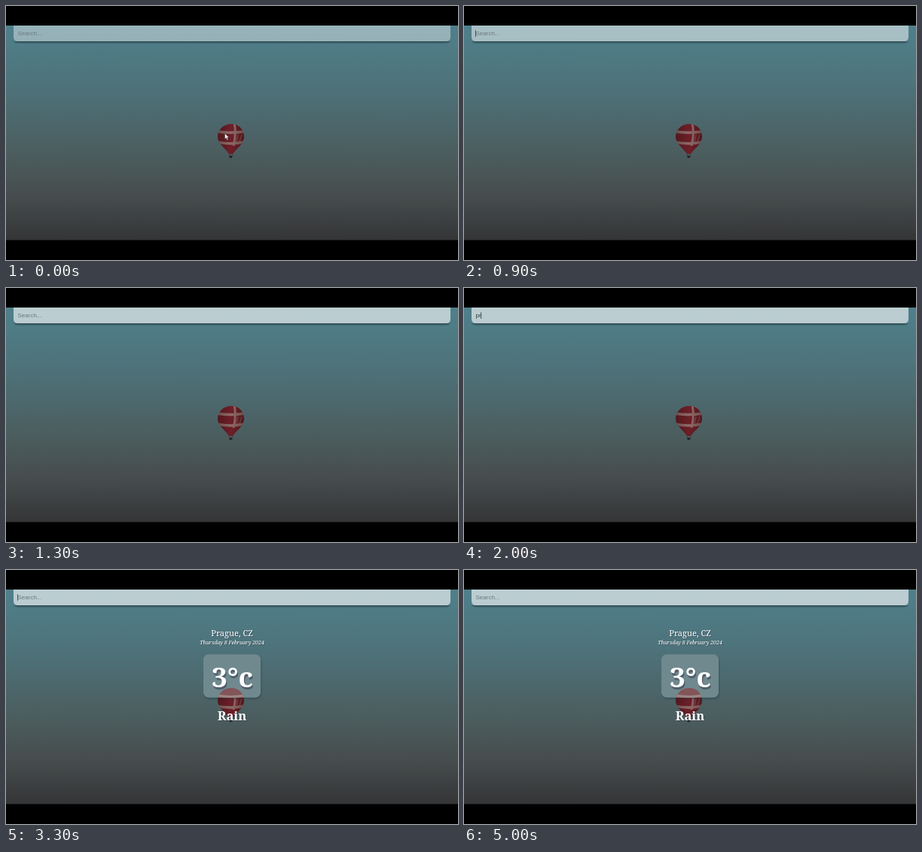
Animation of 600x338 px, one loop 5600 ms. Source, as an HTML page:

```html
<!DOCTYPE html>
<html lang="en">
<head>
<meta charset="utf-8">
<title>Weather search</title>
<style>
  html, body { margin: 0; width: 100%; height: 100%; overflow: hidden; background: #000; }
  svg { display: block; width: 100vw; height: 100vh; }
  .field { font: 8px "Liberation Sans", Arial, sans-serif; white-space: pre; }
  #weather { font-family: "Noto Serif", serif; fill: #fff; text-anchor: middle; }
  .place { font-size: 11px; text-shadow: 1px 1px rgba(50, 50, 70, .5); }
  .date { font-size: 7px; font-style: italic; text-shadow: 1px 1px rgba(50, 50, 70, .5); }
  .temp { font-size: 36.7px; font-weight: 700; text-shadow: 1.3px 2.6px rgba(50, 50, 70, .5); }
  .sky { font-size: 16.6px; font-weight: 700; text-shadow: 1.3px 1.3px rgba(50, 50, 70, .5); }
</style>
</head>
<body>
<svg viewBox="0 0 600 338">
  <defs>
    <linearGradient id="dusk" x1="0" y1="0" x2="0" y2="1">
      <stop offset="0" stop-color="#4f808b"/>
      <stop offset=".25" stop-color="#4e747c"/>
      <stop offset=".45" stop-color="#4c676c"/>
      <stop offset=".62" stop-color="#4b5b5c"/>
      <stop offset=".8" stop-color="#464c4d"/>
      <stop offset="1" stop-color="#343537"/>
    </linearGradient>
    <linearGradient id="shade">
      <stop offset="0" stop-color="#000" stop-opacity=".25"/>
      <stop offset=".5" stop-color="#000" stop-opacity="0"/>
      <stop offset="1" stop-color="#000" stop-opacity=".25"/>
    </linearGradient>
    <filter id="soft" x="-20%" y="-40%" width="140%" height="180%">
      <feGaussianBlur stdDeviation=".8"/>
    </filter>
    <clipPath id="envelope">
      <path id="skin" d="M299 157C288 157 281 165 281 174C281 183 292 190 296 197H301C305 190 316 184 316 174C316 165 310 157 299 157Z"/>
    </clipPath>
    <clipPath id="belowBar"><rect y="47" width="600" height="20"/></clipPath>
    <path id="barShape" d="M10 26H590V41Q590 47 584 47H16Q10 47 10 41Z"/>
  </defs>

  <rect width="600" height="338"/>
  <rect y="26" width="600" height="285.5" fill="url(#dusk)"/>

  <g id="balloon">
    <g clip-path="url(#envelope)">
      <rect x="280" y="156" width="37" height="42" fill="#6d1f28"/>
      <g fill="none" stroke="#906a67">
        <path d="M280 167Q298 170 317 167" stroke-width="3.6"/>
        <path d="M280 181Q298 185 317 181" stroke-width="3.6"/>
        <path d="M303 156Q306 170 302 186" stroke-width="3"/>
        <path d="M308 171L306 180M313 171L310 180" stroke-width="1.4" opacity=".6"/>
      </g>
      <rect x="281" y="156" width="35" height="42" fill="url(#shade)"/>
    </g>
    <path d="M296 197L297 200M301 197L300 200" stroke="#3b3336" stroke-width=".6"/>
    <rect x="296.3" y="199" width="4" height="3.2" rx="1" fill="#272629"/>
  </g>

  <g clip-path="url(#belowBar)">
    <use href="#barShape" y="1.6" fill="#16282e" opacity=".75" filter="url(#soft)"/>
  </g>
  <use id="bar" href="#barShape" fill="#fff"/>
  <text id="entry" class="field" x="15.5" y="39.3"></text>
  <rect id="caret" y="32.3" width=".8" height="8.6" fill="#303638"/>

  <g id="weather">
    <text class="place" x="300" y="88">Prague, CZ</text>
    <text class="date" x="300" y="98.6">Thursday 8 February 2024</text>
    <rect x="263" y="114.3" width="76" height="57.5" rx="7" fill="#20343a" opacity=".4" filter="url(#soft)"/>
    <rect x="262" y="112.3" width="76" height="57.5" rx="7" fill="#6f898f"/>
    <g clip-path="url(#envelope)"><rect x="280" y="156" width="37" height="13.8" fill="#854f53" opacity=".9"/>
      <path d="M280 167Q298 170 317 167" fill="none" stroke="#9d8583" stroke-width="3.2"/></g>
    <text class="temp" x="300.5" y="156">3°c</text>
    <text class="sky" x="300" y="199.6">Rain</text>
  </g>

  <path id="pointer" d="M0 0V7.6L1.8 6L3.1 9L4.4 8.4L3.1 5.6H5.4Z" fill="#fff" stroke="#333" stroke-width=".5"/>
</svg>
<script>
  const LOOP = 5600, STEP = 100;
  const RESULT_AT = 3300;
  const KEYS = [[1700, "p"], [2000, "pr"], [2200, "pra"], [2400, "prag"], [RESULT_AT, ""]];
  const CARET_ON = [[700, 1300], [1700, 2900], [RESULT_AT, 4000], [4500, 5000]];

  const $ = id => document.getElementById(id);
  const [bar, entry, caret, weather, pointer] =
    ["bar", "entry", "caret", "weather", "pointer"].map($);

  const progress = (t, from, to) => Math.min(1, Math.max(0, (t - from) / (to - from)));
  const easeInOut = p => p * p * (3 - 2 * p);
  const easeOut = p => 1 - (1 - p) ** 2;
  const show = (node, on) => node.setAttribute("visibility", on ? "visible" : "hidden");

  function drawField(t) {
    bar.setAttribute("fill-opacity", 0.4 + 0.21 * easeOut(progress(t, 780, 1200)));
    const typed = KEYS.reduce((text, [at, value]) => t >= at ? value : text, "");
    entry.textContent = typed || "Search...";
    entry.setAttribute("fill", typed ? "#30383c" : "#6b787d");
    caret.setAttribute("x", 15.2 + (typed ? entry.getComputedTextLength() : 0));
    show(caret, CARET_ON.some(([from, to]) => t >= from && t < to));
  }

  function drawPointer(t) {
    const p = easeInOut(progress(t, 0, 650));
    const y = 169.5 - 132 * p;
    pointer.setAttribute("transform", `translate(${290.5 - 6 * p} ${y})`);
    show(pointer, y > 47);
  }

  function render(t) {
    drawField(t);
    drawPointer(t);
    show(weather, t >= RESULT_AT);
  }

  const start = performance.now();
  function tick() {
    const t = (performance.now() - start) % LOOP;
    render(Math.floor(t / STEP) * STEP);
    requestAnimationFrame(tick);
  }
  tick();
</script>
</body>
</html>
```
